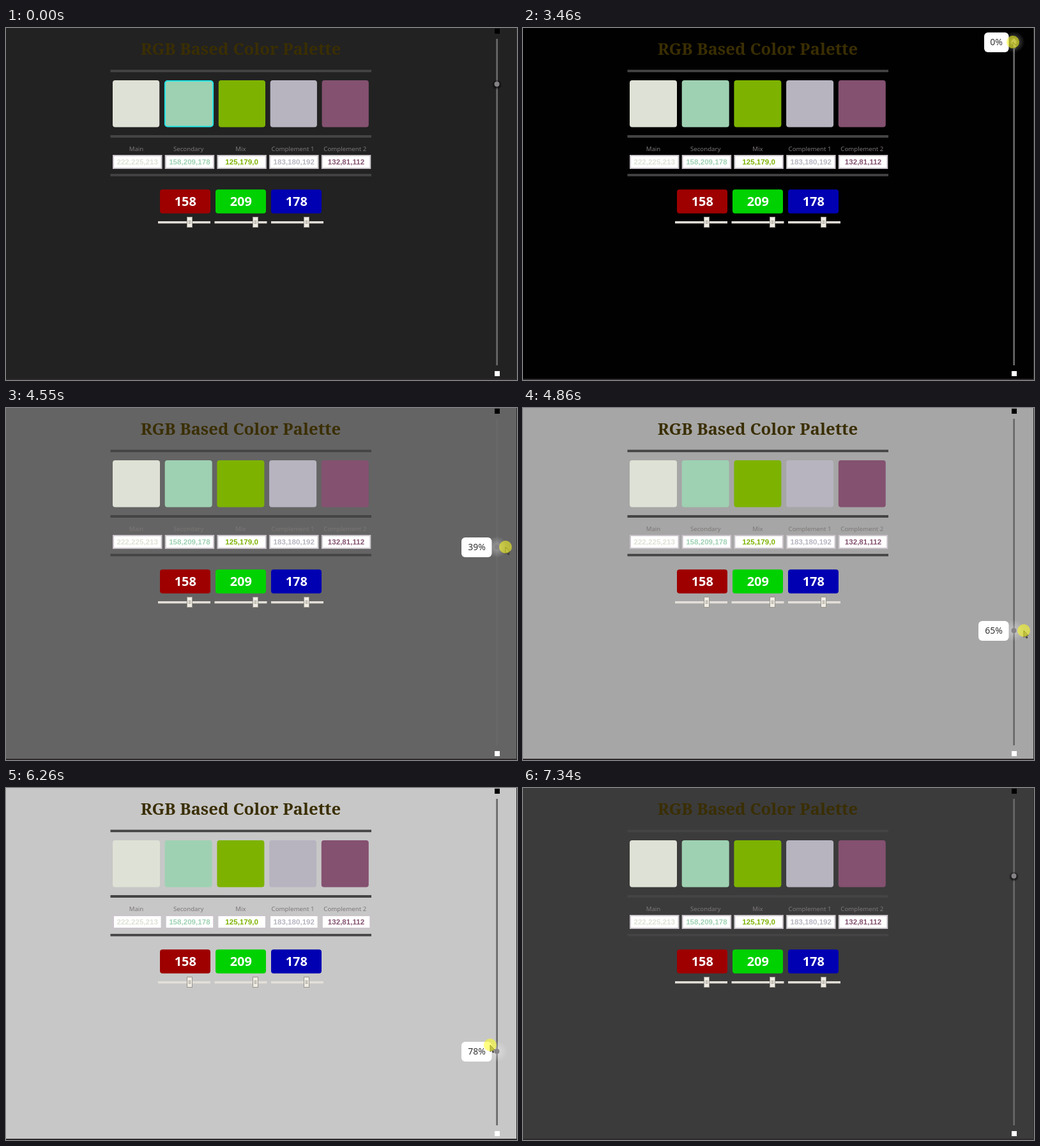
Recreate the animation shown at these times as an HTML page. Size 800x552 px, loop 8040 ms.

```html
<!DOCTYPE html>
<html lang="en">
<head>
<meta charset="utf-8">
<title>Color palette</title>
<style>
  html, body { margin: 0; width: 100%; height: 100%; overflow: hidden; background: #222; }
  svg { display: block; width: 100%; height: 100%; }
  text { text-anchor: middle; }
  .title { font: bold 25.7px "Noto Serif", serif; fill: #3a2e02; }
  .label { font: 9.7px "Noto Sans", sans-serif; fill: #7d7777; }
  .value { font: bold 11.6px "Liberation Sans", Arial, sans-serif; }
  .channel { font: bold 20px "Noto Sans", sans-serif; fill: #fff; }
  .percent { font: 500 14px "Noto Sans", sans-serif; fill: #333; text-anchor: end; }
</style>
</head>
<body>
<svg viewBox="0 0 800 552" xmlns="http://www.w3.org/2000/svg">
  <defs>
    <radialGradient id="glow">
      <stop offset=".2" stop-color="#fff" stop-opacity=".3"/>
      <stop offset="1" stop-color="#fff" stop-opacity="0"/>
    </radialGradient>
    <radialGradient id="shade">
      <stop offset=".5" stop-color="#000" stop-opacity=".65"/>
      <stop offset="1" stop-color="#000" stop-opacity="0"/>
    </radialGradient>
  </defs>
  <rect id="back" width="800" height="552"/>
  <rect x="799" width="1" height="552" fill="#2d2b2c"/>
  <rect y="550" width="800" height="2" fill="#2d292b"/>
  <text class="title" x="367.5" y="42">RGB Based Color Palette</text>
  <path d="M163.500 67.300H572M163.500 170H572M163.500 230.600H572" stroke="#444" stroke-width="3.800"/>
  <g id="palette"></g>
  <g id="channels"></g>
  <rect x="765" y="1" width="8" height="8"/>
  <rect x="765" y="538" width="8" height="8" fill="#fff"/>
  <rect x="767.300" y="17" width="2.700" height="512" fill="#696969"/>
  <g id="knob">
    <circle id="halo" cx="768.500"/>
    <circle cx="768.500" r="4" fill="#868386"/>
    <g id="tip">
      <rect id="bubble" y="-15" height="31" rx="6" fill="#fff"/>
      <text id="percent" class="percent" x="751" y="5"></text>
    </g>
  </g>
  <g id="cursor">
    <path id="arrow" d="M0 0V10.500L2.500 8.300L4.200 12L5.800 11.300L4.200 7.700H7Z" stroke="#111" stroke-width=".8"/>
    <circle id="press" r="10" fill="#ffff1e" fill-opacity=".56"/>
  </g>
</svg>
<script>
const LOOP = 8040, STEP = 77.5;
const PRESS = 2910, DRAG = 3070, RELEASE = 7110;
const TOP = 22, BOTTOM = 525;

// Pointer gestures: each leaves from where the previous one ended, bows
// sideways along a sine and slows down by the given power.
const gestures = [
  { start: 130, end: 900, to: [304, 118], bow: [-50, 0], power: 1 },
  { start: 1450, end: 2220, to: [773, 86], bow: [200, 75], power: 2.5 },
  { start: 2370, end: PRESS, to: [771, 88], bow: [0, 0], power: 1 },
  { start: DRAG, end: 3460, to: [767, TOP], bow: [0, 0], power: 1 },
  { start: 4160, end: 5400, to: [770, 578], bow: [16, 0], power: 1 },
  { start: 6170, end: 6960, to: [771, 128], bow: [-13, 0], power: 2.45, grip: 10 },
  { start: RELEASE, end: 7340, to: [760, 570], bow: [0, 0], power: 1 }
];
gestures.forEach((g, i) => g.from = i ? gestures[i - 1].to : [361, 530]);

const $ = id => document.getElementById(id);
const set = (node, attrs) => { for (const key in attrs) node.setAttribute(key, attrs[key]); };
const show = (id, on) => set($(id), { visibility: on ? 'visible' : 'hidden' });

function add(parent, tag, attrs, text = '') {
  const node = document.createElementNS('http://www.w3.org/2000/svg', tag);
  set(node, attrs);
  node.textContent = text;
  parent.append(node);
  return node;
}

const swatches = [
  ['Main', '222,225,213'],
  ['Secondary', '158,209,178'],
  ['Mix', '125,179,0'],
  ['Complement 1', '183,180,192'],
  ['Complement 2', '132,81,112']
].map(([name, rgb], i) => {
  const g = $('palette'), x = 167 + i * 81.7, fill = `rgb(${rgb})`;
  add(g, 'text', { class: 'label', x: x + 37, y: 193.3 }, name);
  add(g, 'rect', { x: x + 1, y: 200, width: 75.5, height: 20, fill: '#fff', stroke: '#cbc5cb', 'stroke-width': 2 });
  add(g, 'text', { class: 'value', x: x + 38.7, y: 213.8, fill }, rgb);
  return add(g, 'rect', { rx: 4, fill, stroke: '#22e6e8' });
});

[158, 209, 178].forEach((value, i) => {
  const g = $('channels'), x = 241 + i * 87, track = 238 + i * 88.5;
  const thumb = Math.round(track + value / 255 * 73);
  const fill = `rgb(${[0, 1, 2].map(c => c === i ? value : 0)})`;
  add(g, 'rect', { x, y: 253.3, width: 79, height: 37.5, rx: 4, fill });
  add(g, 'text', { class: 'channel', x: x + 39.8, y: 279 }, value);
  add(g, 'rect', { x: track, y: 303, width: 82, height: 3.5, fill: '#e3dfd8' });
  add(g, 'rect', { x: thumb + .5, y: 296.5, width: 8, height: 16, fill: '#efece4', stroke: '#99958c' });
  add(g, 'path', { d: `M${thumb + 2.5} 302.500h4m-4 2h4m-4 2h4`, stroke: '#8a867d', 'stroke-width': .8 });
});

// The selected swatch gains a border, and the row shares out the rest.
function layoutSwatches(border) {
  let x = 167;
  swatches.forEach((box, i) => {
    const own = i === 1 ? border : 0;
    const width = 74 - border * .4 + own * 2;
    set(box, { x: x + own / 2, y: 82 + own / 2, width: width - own, height: 73.5 - own, 'stroke-width': own });
    x += width + 7.7;
  });
}

function pointerAt(t) {
  const g = gestures.findLast(g => g.start <= t) || gestures[0];
  const steps = Math.round((g.end - g.start) / STEP);
  const done = Math.floor((t - g.start + 5) / (g.end - g.start) * steps);
  const k = Math.min(1, (done + 1) / (steps + 1));
  const s = 1 - (1 - k) ** g.power;
  const [x, y] = [0, 1].map(i =>
    Math.round(g.from[i] + (g.to[i] - g.from[i]) * s + g.bow[i] * Math.sin(Math.PI * s)));
  return { x, y, grip: g.grip || 0 };
}

function knobAt(t) {
  if (t < DRAG) return 88;
  const { y, grip } = pointerAt(Math.min(t, RELEASE - 10));
  return Math.min(BOTTOM, y + grip);
}

function draw(t) {
  const { x, y } = pointerAt(t);
  const knobY = knobAt(t);
  const percent = Math.min(100, (knobY - 20) / 5.03);
  const gray = Math.floor(percent * 2.55);
  const label = Math.round(percent) + '%';
  const left = 740 - label.length * 9;
  const dragging = t >= DRAG && t < RELEASE;
  const pressed = t >= PRESS && t < RELEASE;

  set($('back'), { fill: `rgb(${gray},${gray},${gray})` });
  layoutSwatches(t < 1140 ? 2 : t < 1210 ? 1 : 0);

  set($('knob'), { transform: `translate(0 ${knobY})` });
  set($('halo'), dragging ? { fill: 'url(#glow)', r: 17, cy: 0 } : { fill: 'url(#shade)', r: 8, cy: 1 });
  set($('bubble'), { x: left, width: 760.5 - left });
  $('percent').textContent = label;
  show('tip', dragging);

  set($('cursor'), { transform: `translate(${x} ${y})` });
  set($('arrow'), { fill: pressed ? '#777' : '#fff' });
  show('cursor', t >= gestures[0].start);
  show('press', pressed);
}

function tick() {
  draw(performance.now() % LOOP);
  requestAnimationFrame(tick);
}
tick();
</script>
</body>
</html>
```
